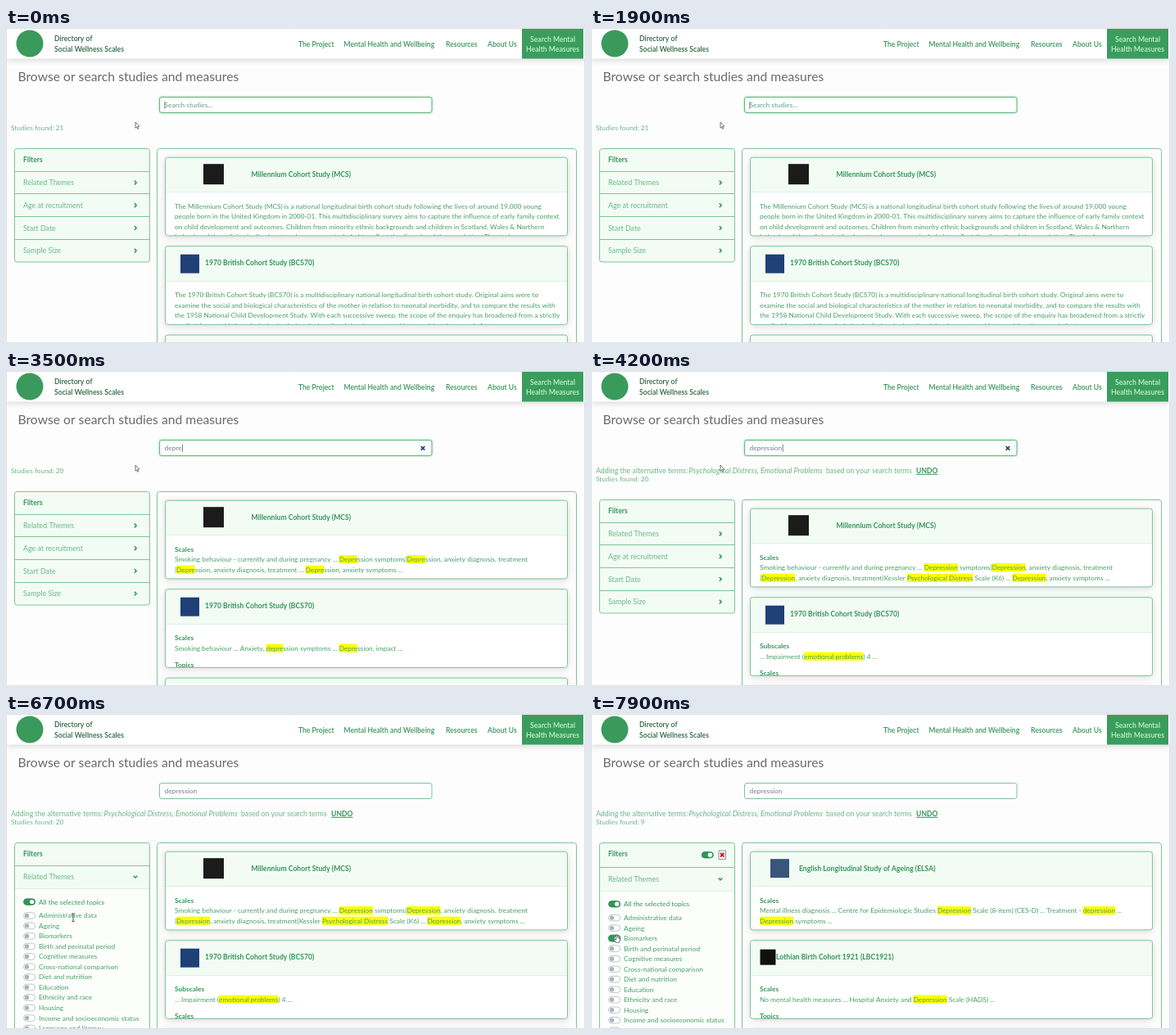
An HTML page with a canvas for the animation above (8000 ms loop, 707x385 px).

```html
<!DOCTYPE html>
<html lang="en">
<head>
<meta charset="utf-8">
<title>Study browser</title>
<style>
html, body { margin: 0; width: 100%; height: 100%; overflow: hidden; background: #fff; }
canvas { display: block; width: 707px; height: 385px; }
</style>
</head>
<body>
<canvas id="stage"></canvas>
<script>
const W = 707, H = 385, LOOP = 8000;
const canvas = document.getElementById('stage');
const ctx = canvas.getContext('2d');
const dpr = window.devicePixelRatio || 1;
canvas.width = W * dpr;
canvas.height = H * dpr;

const GREEN = '#459f66', DEEP = '#36945a', SOFT = '#6ab687', LINE = '#7cc597';
const MINT = '#f2fcf4', PAGE = '#fefdfe', BODY = 8.32;

const QUERY = 'depression';
const KEYS = [2650, 2800, 2980, 3180, 3380, 3600, 3720, 3840, 3940, 4040];
const EXPAND = 4150, BLUR = 5850, OPEN = 5880, TOGGLE = 7450, APPLY = 7600;

const TOPICS = ['Administrative data', 'Ageing', 'Biomarkers', 'Birth and perinatal period',
  'Cognitive measures', 'Cross-national comparison', 'Diet and nutrition', 'Education',
  'Ethnicity and race', 'Housing', 'Income and socioeconomic status', 'Language and literacy'];
const ROWS = ['Related Themes', 'Age at recruitment', 'Start Date', 'Sample Size'];

// A leading # marks a subheading, square brackets mark a match.
const MCS = { title: 'Millennium Cohort Study (MCS)', x: 299.5, logo: [241, 8, 25, '#1b1b1b'] };
const BCS = { title: '1970 British Cohort Study (BCS70)', x: 243, logo: [213, 10, 23, '#1f3f77'] };
const ELSA = { title: 'English Longitudinal Study of Ageing (ELSA)', x: 254, logo: [219, 9, 23, '#38557a'] };
const LBC = { title: 'Lothian Birth Cohort 1921 (LBC1921)', x: 226, logo: [206.5, 11, 19, '#111'] };
const smoking = 'Smoking behaviour - currently and during pregnancy ... [Depression] symptoms|[Depression], anxiety diagnosis, treatment';

const RESULTS = {
  all: [
    [MCS, ['The Millennium Cohort Study (MCS) is a national longitudinal birth cohort study following the lives of around 19,000 young',
      'people born in the United Kingdom in 2000-01. This multidisciplinary survey aims to capture the influence of early family context',
      'on child development and outcomes. Children from minority ethnic backgrounds and children in Scotland, Wales & Northern',
      'Ireland, and those living in disadvantaged areas, were included to reflect the diversity of the population. The study']],
    [BCS, ['The 1970 British Cohort Study (BCS70) is a multidisciplinary national longitudinal birth cohort study. Original aims were to',
      'examine the social and biological characteristics of the mother in relation to neonatal morbidity, and to compare the results with',
      'the 1958 National Child Development Study. With each successive sweep, the scope of the enquiry has broadened from a strictly',
      'medical focus at birth, to include physical and educational development, and later social and economic factors']]
  ],
  typed: [
    [MCS, ['#Scales', smoking,
      '|[Depression], anxiety diagnosis, treatment ... [Depression], anxiety symptoms ...']],
    [BCS, ['#Scales', 'Smoking behaviour ... Anxiety, [depression] symptoms ... [Depression], impact ...', '#Topics']]
  ],
  expanded: [
    [MCS, ['#Scales', smoking,
      '|[Depression], anxiety diagnosis, treatment|Kessler [Psychological Distress] Scale (K6) ... [Depression], anxiety symptoms ...']],
    [BCS, ['#Subscales', '... Impairment ([emotional problems]) 4 ...', '#Scales']]
  ],
  filtered: [
    [ELSA, ['#Scales',
      'Mental illness diagnosis ... Centre for Epidemiologic Studies [Depression] Scale (8-item) (CES-D) ... Treatment - [depression] ...',
      '[Depression] symptoms ...']],
    [LBC, ['#Scales', 'No mental health measures ... Hospital Anxiety and [Depression] Scale (HADS) ...', '#Topics']]
  ]
};

// time, tip x, tip y
const POINTER = [[0, 158, 115], [4950, 158, 115], [5550, 113, 206], [6150, 113, 206],
  [6600, 82, 244], [6800, 82, 244], [7250, 31.5, 270], [8000, 31.5, 270]];

const clamp = v => Math.max(0, Math.min(1, v));
const ease = v => { v = clamp(v); return v * v * (3 - 2 * v); };

function text(s, x, y, size, color, style = '400', align = 'left') {
  ctx.font = `${style} ${size}px Lato, sans-serif`;
  ctx.fillStyle = color;
  ctx.textAlign = align;
  ctx.fillText(s, x, y + size * 0.35);
  return ctx.measureText(s).width;
}

function box(x, y, w, h, r, fill, stroke, width = 1) {
  ctx.beginPath();
  ctx.roundRect(x, y, w, h, r);
  if (fill) { ctx.fillStyle = fill; ctx.fill(); }
  if (stroke) { ctx.strokeStyle = stroke; ctx.lineWidth = width; ctx.stroke(); }
}

function path(points, color, width) {
  ctx.beginPath();
  points.forEach(([x, y]) => ctx.lineTo(x, y));
  ctx.strokeStyle = color;
  ctx.lineWidth = width;
  ctx.stroke();
}

const hline = (x1, x2, y, color) => path([[x1, y], [x2, y]], color, 1);

function cross(x, y, r, color, width) {
  path([[x - r, y - r], [x + r, y + r]], color, width);
  path([[x + r, y - r], [x - r, y + r]], color, width);
}

function shadow(color, blur, y, draw) {
  ctx.save();
  ctx.shadowColor = color;
  ctx.shadowBlur = blur * dpr;
  ctx.shadowOffsetY = y * dpr;
  draw();
  ctx.restore();
}

function clipped(x, y, w, h, draw) {
  ctx.save();
  ctx.beginPath();
  ctx.rect(x, y, w, h);
  ctx.clip();
  draw();
  ctx.restore();
}

function rich(line, x, y, count) {
  line.split(/[\[\]]/).forEach((part, i) => {
    if (i % 2) {
      ctx.font = `400 ${BODY}px Lato, sans-serif`;
      ctx.fillStyle = '#ffff00';
      ctx.fillRect(x, y - 5.2, ctx.measureText(part.slice(0, count)).width, 10.2);
    }
    x += text(part, x, y, BODY, GREEN);
  });
}

function header() {
  shadow('rgba(0,0,0,.16)', 8, 1, () => box(0, 0, W, 37.5, 0, '#fff'));
  ctx.fillStyle = '#3a9a5c';
  ctx.beginPath();
  ctx.arc(29, 19, 16.5, 0, 7);
  ctx.fill();
  text('Directory of', 59, 13, 8.7, '#2a6340', '600');
  text('Social Wellness Scales', 59, 25.5, 8.7, '#2a6340', '600');
  [['The Project', 357], ['Mental Health and Wellbeing', 412.5], ['Resources', 537], ['About Us', 588]]
    .forEach(([s, x]) => text(s, x, 19.5, 8.6, DEEP, '600'));
  box(630, 1, 75, 36.5, 0, '#3a9d5e');
  text('Search Mental', 667.5, 13.5, 8.7, '#c8f3cf', '600', 'center');
  text('Health Measures', 667.5, 26, 8.7, '#c8f3cf', '600', 'center');
}

function search(t, typed) {
  const focused = t < BLUR;
  const field = () => box(187.5, 84.5, 332.5, 19, 2.5, '#fff', focused ? '#62bb83' : LINE);
  if (focused) shadow('rgba(70,175,110,.4)', 3, 0, field);
  else field();
  const value = QUERY.slice(0, typed);
  const w = text(value || 'Search studies...', 193.5, 94.3, 8.4, typed ? '#777d82' : '#62a07b');
  if (!focused) return;
  if (typed) cross(509, 94.3, 2.3, '#1d3a68', 1.6);
  const since = typed ? t - KEYS[typed - 1] : t + 200;
  if (since % 1000 < 500) {
    ctx.fillStyle = '#666';
    ctx.fillRect(typed ? 194 + w : 193.5, 89.5, 0.8, 9.5);
  }
}

function summary(t, typed) {
  const found = t >= APPLY ? 9 : typed > 1 ? 20 : 21;
  const wide = t >= EXPAND;
  text('Studies found: ' + found, 6, wide ? 131.8 : 121.9, 8.4, SOFT);
  if (!wide) return;
  text('Adding the alternative terms:', 6, 121.9, 8.8, SOFT);
  text('Psychological Distress, Emotional Problems', 119.5, 121.9, 9.2, SOFT, 'italic 400');
  text('based on your search terms', 287, 121.9, 8.7, SOFT);
  const w = text('UNDO', 397, 121.9, 8.6, DEEP, '700');
  hline(397, 397 + w, 126.3, DEEP);
}

function toggle(x, y, on) {
  const tint = on > 0.5;
  box(x, y - 3.8, 14.2, 7.6, 3.8, tint ? '#339458' : '#fff', tint ? '#2f8a50' : '#b4bac0', 0.8);
  ctx.fillStyle = tint ? '#fff' : '#adb3ba';
  ctx.beginPath();
  ctx.arc(x + 4 + 6.2 * on, y, 2.7, 0, 7);
  ctx.fill();
}

function chevron(x, y, down) {
  const pts = down ? [[-2.4, -1.2], [0, 1.2], [2.4, -1.2]] : [[-1.2, -2.4], [1.2, 0], [-1.2, 2.4]];
  path(pts.map(([a, b]) => [x + a, y + b]), DEEP, 1.5);
}

function filters(t, dy) {
  const applied = t >= APPLY, open = t >= OPEN;
  const top = 147.5 + dy, rowH = 27.7;
  const headH = 27.7 + (applied ? 2.7 : 0);
  const bodyH = 350 * ease((t - OPEN) / 350);
  box(10.5, top, 165, headH + rowH * 4 + bodyH, 3, MINT, LINE);
  text('Filters', 21, top + 13.7, 8.5, DEEP, '700');
  if (applied) {
    toggle(135.2, top + 14.7, 1);
    box(156, top + 9.5, 8.5, 10.5, 0, '#fff', '#777', 0.8);
    cross(160.2, top + 14.7, 2.3, '#d3121f', 1.8);
  }
  let y = top + headH;
  ROWS.forEach((name, i) => {
    hline(11, 175, Math.floor(y) + 0.5, LINE);
    text(name, 21, y + 13.8, 8.9, SOFT);
    chevron(158, y + 13.8, open && i === 0);
    y += rowH;
    if (i || !bodyH) return;
    const body = y;
    clipped(11, body, 164, bodyH, () => {
      box(11, body, 164, bodyH, 0, '#fcfefc');
      hline(11, 175, body + 0.5, '#d5eedc');
      toggle(21.5, body + 16.7, 1);
      text('All the selected topics', 40, body + 16.7, BODY, DEEP);
      TOPICS.forEach((topic, k) => {
        const ty = body + 33.5 + k * 12.52;
        const on = topic === 'Biomarkers' ? ease((t - TOGGLE) / 150) : 0;
        if (on) box(20, ty - 5.2, 17.2, 10.4, 5.2, 'rgba(70,175,110,.3)');
        toggle(21.5, ty, on);
        text(topic, 40, ty, BODY, GREEN);
      });
    });
    y += bodyH;
  });
}

function card(top, study, lines, count) {
  shadow('rgba(0,0,0,.16)', 8, 1.5, () => box(194.5, top, 491, 95.7, 3, '#fff'));
  box(194.5, top, 491, 42.7, [3, 3, 0, 0], MINT);
  hline(195, 685, Math.round(top + 42) + 0.5, '#e0efe4');
  if (study) {
    const [x, y, size, color] = study.logo;
    box(x, top + y, size, size, 0, color);
    text(study.title, study.x, top + 20.7, 8.65, DEEP, '700');
    clipped(195, top, 490, 95.7, () => {
      let y = top + 59.6;
      lines.forEach((line, i) => {
        if (line[0] === '#') {
          if (i) y += 8;
          text(line.slice(1), 206, y, 8.4, DEEP, '700');
        } else rich(line, 206, y, count);
        y += 12.5;
      });
    });
  }
  box(194.5, top, 491, 95.7, 3, null, LINE);
}

function results(t, typed, dy) {
  const state = t >= APPLY ? 'filtered' : t >= EXPAND ? 'expanded' : typed > 1 ? 'typed' : 'all';
  const count = t >= EXPAND ? 99 : typed;
  box(184.5, 147.5 + dy, 512, 400, 3, PAGE, LINE);
  RESULTS[state].forEach(([study, lines], i) => card(158.2 + dy + i * 108.5, study, lines, count));
  card(375.2 + dy);
}

function outline(points) {
  ctx.beginPath();
  points.forEach(([x, y]) => ctx.lineTo(x, y));
  ctx.closePath();
  ctx.fillStyle = '#fff';
  ctx.fill();
  ctx.strokeStyle = '#555';
  ctx.lineWidth = 0.8;
  ctx.stroke();
}

function pointer(t) {
  const i = POINTER.findIndex(p => p[0] > t);
  const [a, b] = [POINTER[i - 1], POINTER[i]];
  const k = ease((t - a[0]) / (b[0] - a[0]));
  ctx.save();
  ctx.translate(a[1] + (b[1] - a[1]) * k, a[2] + (b[2] - a[2]) * k);
  const overText = t > 6450 && t < 7100;
  if (overText) {
    path([[-1.8, 0], [1.8, 0]], '#444', 0.8);
    path([[0, 0], [0, 9.5]], '#444', 0.9);
    path([[-1.8, 9.5], [1.8, 9.5]], '#444', 0.8);
  } else if (t > 5400) {
    outline([[-0.9, 0], [0.7, 0], [0.8, 3.2], [3.6, 4], [3.8, 6.5], [2.8, 9.3], [-1.2, 9.3],
      [-3.2, 6.2], [-2.6, 5.2], [-0.9, 6.2]]);
  } else {
    outline([[0, 0], [0, 7.2], [1.6, 5.8], [2.7, 8.4], [3.8, 7.9], [2.7, 5.4], [4.8, 5.2]]);
  }
  ctx.restore();
}

function draw(t) {
  ctx.setTransform(dpr, 0, 0, dpr, 0, 0);
  ctx.fillStyle = PAGE;
  ctx.fillRect(0, 0, W, H);
  const typed = KEYS.filter(k => t >= k).length;
  const dy = t >= EXPAND ? 10 : 0;
  header();
  text('Browse or search studies and measures', 14.5, 59.3, 15.7, '#666b6e');
  search(t, typed);
  summary(t, typed);
  filters(t, dy);
  results(t, typed, dy);
  box(0.5, 0.5, W - 1, H - 1, 0, null, '#e2e2e2');
  pointer(t);
}

const start = performance.now();
function tick() {
  draw((performance.now() - start) % LOOP);
  requestAnimationFrame(tick);
}
tick();
</script>
</body>
</html>
```
